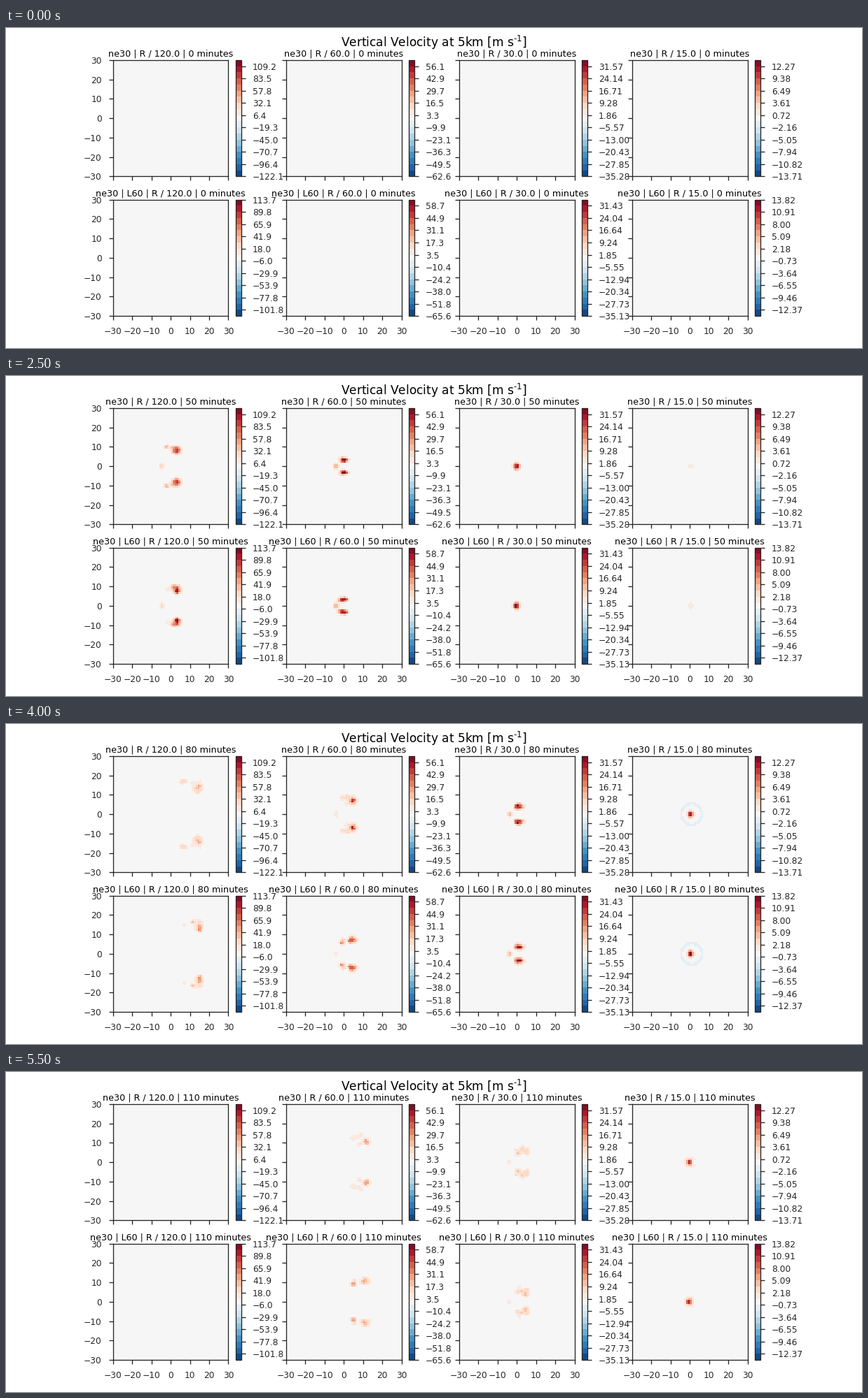
Write a matplotlib script that moves like this. It is 1222 by 458 pixels and loops after 6000 ms.

```python
import numpy as np
import matplotlib.pyplot as plt
from matplotlib.animation import FuncAnimation
from matplotlib.colors import BoundaryNorm, ListedColormap

DPI = 1222 / 16
DARK = "0.15"
plt.rcParams.update({
    "font.family": "DejaVu Sans", "axes.edgecolor": DARK, "axes.linewidth": 1.25,
    "axes.titlesize": 12, "axes.titlepad": 5,
})
for side in ("xtick", "ytick"):
    plt.rcParams.update({
        f"{side}.color": DARK, f"{side}.labelsize": 11.6, f"{side}.major.size": 6,
        f"{side}.major.width": 1.25, f"{side}.major.pad": 9,
    })

STEPS, STEP_MINUTES = 12, 10
LIMITS = ((122.08, 62.648, 35.281, 13.71), (113.745, 65.6, 35.13, 13.822))
PEAK = (12, 30, 50, 100)  # minute of the strongest single updraft, per column
RISE = (7, 13, 18, 42)    # minutes it takes to build up

LEVELS = np.arange(-9.5, 10)
cmap = ListedColormap(plt.get_cmap("RdBu_r")(np.linspace(0, 1, 21)[1:-1]))
norm = BoundaryNorm(LEVELS, cmap.N)

edges = np.arange(-30, 31)
X, Y = np.meshgrid(edges[:-1] + 0.5, edges[:-1] + 0.5)


def spot(x, y, strength, width, height):
    return strength * np.exp(-((X - x) / width) ** 2 / 2 - ((Y - y) / height) ** 2 / 2)


def pair(x, y, *shape):
    return spot(x, y, *shape) + spot(x, -y, *shape)


def ring(x, radius, strength, width=0.6):
    return strength * np.exp(-((np.hypot(X - x, Y) - radius) / width) ** 2 / 2)


def core(col, age):
    """Central updraft: builds up, then slides left and fades."""
    slide = np.clip(age / 20, 0, 1) ** 2
    if age < 0:
        strength = 9.4 * np.exp(-(age / RISE[col]) ** 4)
    else:
        strength = max(9.4 - 5.2 * slide - 0.075 * max(age - 20, 0), 0)
    return spot(-1.2 + 0.5 * col - 3.4 * slide, 0, strength, 1.1 - 0.2 * slide, 1.15 - 0.25 * slide)


def outflow(col, age):
    """Weak sinking ring that widens while the updraft builds up."""
    phase = age / RISE[col]
    if not -0.8 < phase < -0.2:
        return 0
    return ring(0.6 * col - 0.8, 2.8 + 0.19 * (age + 0.8 * RISE[col]), -1.1)


def split(col, age, rng):
    """Mirrored pair that drifts right and apart, shedding small fragments."""
    if age <= 0:
        return 0
    born, late = min(age / 20, 1), max(age - 20, 0)
    x = -1 + 1.2 * col * born + 0.084 * 0.55 ** col * late ** 1.35
    y = min(3.2 * born + 0.28 * 0.45 ** col * late, 14)
    strength = max(9.5 * np.exp(-0.17 * col ** 2) - 0.125 * 0.7 ** col * late, 0) * born
    total = pair(x, y, strength, 1.4, 0.75 + 0.4 * min(late / 20, 1))

    reach = min(age / 60, 1) * 0.8 ** col
    visible = np.clip((age - 10) / 20, 0, 1) * min(strength / 3, 1)
    for dx, dy, power in rng.uniform((-9, -3, 1.1), (1, 4, 2.4), (6, 3)):
        total = total + pair(x + dx * reach, y + dy * reach, power * visible, 0.9, 0.75)
    return total


def field(row, col, minute):
    rng = np.random.default_rng(10 * row + col)
    age = minute - PEAK[col]
    total = core(col, age) + outflow(col, age) + split(col, age, rng)
    rough = rng.normal(0, 0.1, X.shape)
    return np.clip(total * (1 + rough + rough[::-1]), -9.4, 9.4)


def title(row, col, minute):
    return f"ne30 | {'L60 | ' * row}R / {120 / 2 ** col} | {minute} minutes"


fig, axes = plt.subplots(2, 4, figsize=(16, 458 / DPI), dpi=DPI, sharex=True, sharey=True,
                         gridspec_kw=dict(left=0.125, right=0.9, bottom=0.1, top=0.9,
                                          wspace=0.2, hspace=0.2))
fig.suptitle("Vertical Velocity at 5km [m s$^{\u20101}$]", fontsize=16)
panels = []
for (row, col), ax in np.ndenumerate(axes):
    mesh = ax.pcolormesh(edges, edges, np.zeros_like(X), cmap=cmap, norm=norm)
    ax.set(xlim=(-30, 30), ylim=(-30, 30), xticks=range(-30, 31, 10), yticks=range(-30, 31, 10))
    bar = fig.colorbar(mesh, ax=ax)
    ticks = LEVELS[int(row == 1 and col in (0, 3))::2]
    digits = 1 if col < 2 else 2
    bar.set_ticks(ticks, labels=[f"{t / 9.5 * LIMITS[row][col]:.{digits}f}".replace("-", "\u2212")
                                 for t in ticks])
    bar.ax.minorticks_off()
    panels.append((row, col, mesh, ax.set_title(title(row, col, 0))))


def update(step):
    minute = step * STEP_MINUTES
    for row, col, mesh, label in panels:
        mesh.set_array(field(row, col, minute))
        label.set_text(title(row, col, minute))
    return []


anim = FuncAnimation(fig, update, frames=STEPS, interval=500, repeat=True, repeat_delay=0)
plt.show()
```
